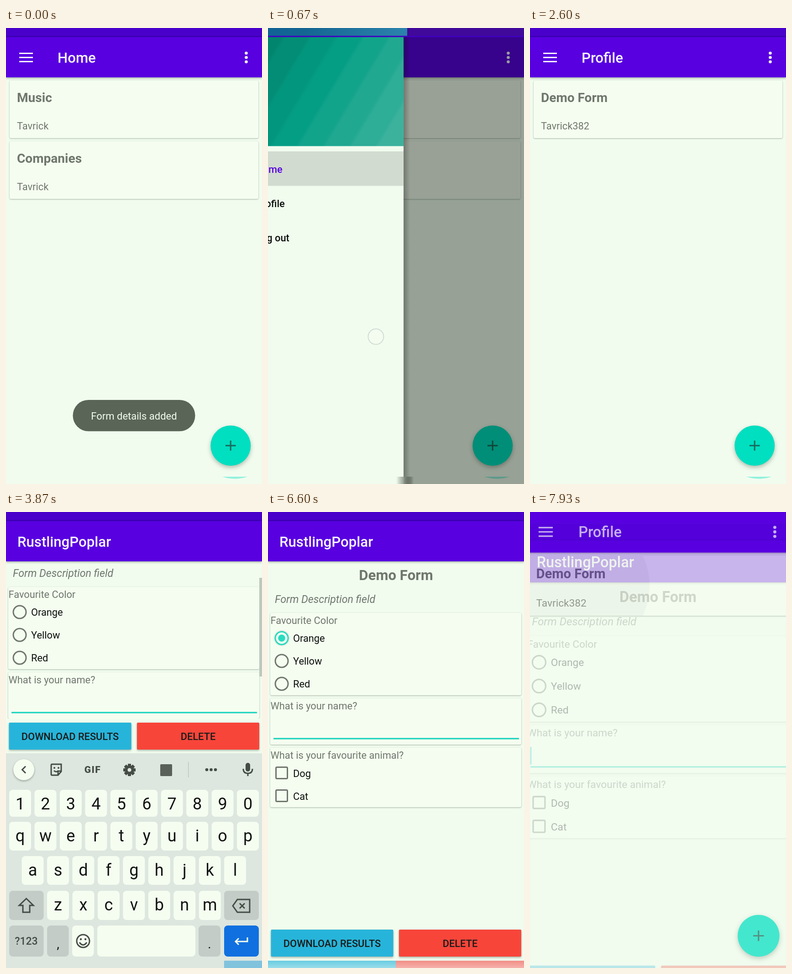
Write an HTML page that moves like this. It is 561 by 998 pixels and loops after 8000 ms.

```html
<!DOCTYPE html>
<html lang="en">
<head>
<meta charset="utf-8">
<title>Form app</title>
<style>
html, body { margin: 0; width: 100%; height: 100%; overflow: hidden; background: #f1fcef; }
svg { display: block; width: 100vw; height: 100vh; }
text { font-family: Roboto, "Noto Sans", sans-serif; font-size: 21.8px; fill: #6f776d; }
.bar { font-size: 31.2px; font-weight: 500; fill: #f7f4ff; }
.head { font-size: 28.05px; font-weight: 700; }
.med { font-weight: 500; }
.ink { fill: #0c100c; }
.mid { text-anchor: middle; }
.key { font-size: 36px; text-anchor: middle; fill: #111411; }
.card { fill: #f5fdf0; filter: drop-shadow(0 1.5px 1.5px rgba(0, 20, 0, .32)); }
.lift { filter: drop-shadow(0 4px 5px rgba(0, 20, 0, .28)); }
.low { filter: drop-shadow(0 2px 2px rgba(0, 20, 0, .32)); }
.line { fill: none; stroke-width: 3; }
</style>
</head>
<body>
<svg id="stage" viewBox="0 0 561 998" preserveAspectRatio="none"></svg>
<script>
const USER = "Tavrick", LOGIN = "Tavrick382", APP = "RustlingPoplar";
const stage = document.getElementById("stage");
const DURATION = 8000;

const rect = (x, y, w, h, fill, r = 0, more = "") =>
  `<rect x="${x}" y="${y}" width="${w}" height="${h}" rx="${r}" fill="${fill}" ${more}/>`;
const circle = (x, y, r, fill, more = "") =>
  `<circle cx="${x}" cy="${y}" r="${r}" fill="${fill}" ${more}/>`;
const text = (x, y, s, cls = "", more = "") =>
  `<text x="${x}" y="${y}" class="${cls}" ${more}>${s}</text>`;
const line = (d, color, w = 3, more = "") =>
  `<path d="${d}" class="line" style="stroke:${color};stroke-width:${w}" ${more}/>`;
const group = (id, body, more = "") => `<g id="${id}" ${more}>${body}</g>`;
const card = (x, y, w, h) => rect(x, y, w, h, "#f5fdf0", 3, 'class="card"');

const statusBar = rect(0, -16, 561, 36, "#4a00cb");
const statusEdge = rect(0, 17, 561, 3, "#3c00b4");
const toolbar = rect(0, 20, 561, 88, "#5800e0", 0, 'class="low"') + statusBar + statusEdge;

const listCard = (y, head, sub) =>
  card(8, y, 545, 126) + text(24, y + 47, head, "head") + text(24, y + 107, sub);

const menuButtons =
  line("M29 55.5H59M29 64.5H59M29 73.5H59", "#f7f4ff") +
  [55, 64.5, 74].map(y => circle(526.5, y, 3.3, "#f7f4ff")).join("");

const fab =
  `<g class="lift">${circle(492.3, 914, 44, "#00dfc0")}</g>` +
  line("M481 914H503.5M492.2 903V925", "#17695b") +
  `<path d="M474 982H530Q502 991 474 982" fill="#00dfc0" opacity=".4"/>`;

const toast =
  rect(146.5, 814, 268, 68.5, "#5b6557", 34) +
  text(280.5, 857, "Form details added", "mid", 'style="font-size:22px;fill:#f1fcef"');

const drawer =
  rect(0, 0, 436, 998, "#f1fcef") +
  rect(436, 0, 14, 982, "url(#edge)") +
  rect(420, 982, 38, 16, "url(#blur)") +
  rect(436, 0, 561, 17, "#5a12c0", 0, 'opacity=".4"') +
  rect(0, 0, 444, 17, "url(#sky)") +
  rect(0, 20, 436, 238.5, "url(#header)") +
  circle(62, 153.5, 34.3, "#3ddc84", 'class="low"') +
  text(25, 227, LOGIN, "", 'style="fill:#e9f8ef"') +
  rect(0, 270, 436, 75.5, "#d2dbd0") +
  `<path d="M44 293L29 307H33.500V321H41V312H47V321H54.500V307H59Z" fill="#5800e0"/>` +
  circle(43.500, 376.500, 6.300, "#6f776d") +
  `<path d="M31 396V392Q32 386 43.500 386T56 392V396Z" fill="#6f776d"/>` +
  line("M31 453V445H56V471H31V463M30 458H49M42.500 451L49.500 458L42.500 465", "#6f776d") +
  text(112, 317, "Home", "med", 'style="fill:#5800e0"') +
  text(112, 391.5, "Profile", "med ink") + text(112, 466.5, "Log out", "med ink");

const radio = (y, label) =>
  circle(30, y, 14, "none", 'stroke="#6f776d" stroke-width="3"') + text(55, y + 8, label, "ink");
const check = (y, label) =>
  rect(17.5, y - 12.5, 25, 25, "none", 2, 'stroke="#6f776d" stroke-width="3"') + text(55, y + 8.5, label, "ink");

const fields =
  text(280.5, 149, "Demo Form", "head mid", 'style="font-size:31.2px"') +
  text(15, 198.5, "Form Description field", "", 'style="font-size:23.2px;font-style:italic"') +
  card(5, 221, 550, 180) + text(5.5, 245, "Favourite Color") +
  radio(276, "Orange") + radio(326, "Yellow") + radio(376, "Red") +
  group("picked",
    circle(30, 276, 14, "#f5fdf0", 'stroke="#00d6ba" stroke-width="3"') + circle(30, 276, 7.8, "#00d6ba")) +
  card(5, 408, 550, 101) + text(5.5, 432, "What is your name?") +
  rect(12, 494.5, 538, 3, "#13d1bd") +
  rect(11.500, 454, 2.500, 37, "#13d1bd", 0, 'id="cursor"') +
  card(5, 516, 550, 130) + text(5.5, 540, "What is your favourite animal?") +
  check(571, "Dog") + check(621, "Cat");

const button = (x, color, label) =>
  rect(x, 914, 268, 59, color, 2, 'class="low"') +
  text(x + 134, 952, label, "med mid", 'style="fill:#191b19"');

const keyRow = (chars, x, y, h, base) => [...chars].map((c, i) => {
  const left = x + 55.45 * i;
  return rect(left, y, 48, h, "#f5fdf0", 8) + text(left + 24, base, c, "key");
}).join("");

const GREY = "#c3ccc6", INK = "#454c46";
const gear = Array.from({ length: 8 }, (_, i) =>
  rect(267, 551, 7, 7, INK, 1, `transform="rotate(${i * 45} 270.5 564.5)"`)).join("") +
  circle(270.5, 564.5, 7, "none", `stroke="${INK}" stroke-width="6"`);

const keyboard =
  rect(0, 528, 561, 470, "#dde6df") +
  circle(39, 564, 23, "#f5fdf0", 'class="low"') + line("M43 556.5L35.500 564L43 571.500", INK) +
  line("M101 552H121V568L114 576H101Q99 576 99 574V554Q99 552 101 552M122 567H114V576M105 566Q110 571 115 566", INK) +
  circle(106, 560, 2, INK) + circle(115, 560, 2, INK) +
  text(190, 571, "GIF", "mid", `style="font-weight:900;font-size:21px;fill:${INK};letter-spacing:1.5px"`) +
  gear + rect(338, 552, 26, 26, "#59605a", 2) + rect(399, 547, 1.5, 34, "#bec7c1") +
  [440, 449.5, 459].map(x => circle(x, 564, 3.3, INK)).join("") +
  rect(525, 549, 10, 19, INK, 5) + line("M520 562Q520 572 530 572T540 562M530 572V578", INK) +
  keyRow("1234567890", 7, 608, 59, 651) +
  keyRow("qwertyuiop", 7, 678, 63, 721) +
  keyRow("asdfghjkl", 34.5, 753, 63, 796) +
  keyRow("zxcvbnm", 90, 829, 64, 872) +
  rect(7, 829, 75.5, 64, GREY, 8) + line("M44.500 846L29 861H37V876H52V861H60Z", INK) +
  rect(478, 829, 76, 64, GREY, 8) +
  line("M507 848H534V876H507L497 862ZM512 856.500L523 867.500M523 856.500L512 867.500", INK) +
  rect(7, 905, 75.500, 68, GREY, 8) +
  text(44.500, 947, "?123", "med mid", `style="font-size:23px;fill:${INK}"`) +
  rect(90, 905, 47.500, 68, GREY, 8) + text(114, 955, ",", "key", 'style="font-size:28px"') +
  rect(145, 905, 47.500, 68, "#f5fdf0", 8) +
  circle(169, 939, 14, "none", `stroke="${INK}" stroke-width="3"`) +
  circle(164, 935, 2.200, INK) + circle(174, 935, 2.200, INK) + line("M161 942Q169 953 177 942", INK) +
  rect(200, 905, 215, 68, "#f5fdf0", 8) +
  rect(422, 905, 48, 68, GREY, 8) + text(446, 955, ".", "key", 'style="font-size:28px"') +
  rect(478, 905, 76, 68, "#1070e0", 8) +
  line("M529 931V940H503M510 933L503 940L510 947", "#f5fdf0") +
  rect(478, 982, 83, 16, "#38a6dc", 0, 'opacity=".55"');

const grad = (id, x1, y1, x2, y2, stops) =>
  `<linearGradient id="${id}" gradientUnits="userSpaceOnUse" x1="${x1}" y1="${y1}" x2="${x2}" y2="${y2}">` +
  stops.map(([o, c, a = 1]) => `<stop offset="${o}" stop-color="${c}" stop-opacity="${a}"/>`).join("") +
  "</linearGradient>";

// Diagonal bands: dark green up to the middle, then towards pale teal
const BANDS = 10;
const mix = (a, b, u) => `rgb(${a.map((v, i) => Math.round(v + (b[i] - v) * u))})`;
const bandColor = u => u < .55
  ? mix([0, 112, 92], [4, 158, 133], u / .55)
  : mix([4, 158, 133], [67, 181, 160], (u - .55) / .45);
const bands = Array.from({ length: BANDS }, (_, i) => {
  const color = bandColor((i + .5) / BANDS);
  return [[(i + .08) / BANDS, color], [(i + .92) / BANDS, color]];
}).flat();

stage.innerHTML =
  "<defs>" +
  grad("header", 0, 20, 425, 275, bands) +
  grad("sky", 0, 0, 436, 0, [[0, "#0a5c9c"], [.5, "#146692"], [1, "#2b82ac"]]) +
  grad("edge", 436, 0, 450, 0, [[0, "#000", .26], [1, "#000", 0]]) +
  grad("blur", 420, 0, 458, 0, [[0, "#f1fcef"], [.55, "#6d756a", .8], [1, "#000", 0]]) +
  grad("fade", 0, 982, 0, 998, [[0, "#fff", .2], [1, "#fff", .45]]) +
  `<clipPath id="body"><rect id="window" x="0" y="108" width="561" height="797"/></clipPath>` +
  `<clipPath id="firstCard"><rect x="8" y="115" width="545" height="126" rx="3"/></clipPath>` +
  "</defs>" +
  group("main",
    rect(-20, -20, 601, 1038, "#f1fcef") +
    group("home", listCard(115, "Music", USER) + listCard(248, "Companies", USER)) +
    group("profile", listCard(115, "Demo Form", LOGIN)) +
    circle(120, 178, 0, "#000", 'id="ripple" opacity=".04" clip-path="url(#firstCard)"') +
    toolbar + text(113, 76, "", "bar", 'id="title"') + menuButtons + fab +
    group("toast", toast) +
    rect(0, 0, 561, 998, "#000a00", 0, 'id="scrim"') +
    group("drawer", drawer) +
    rect(0, 17, 561, 3, "#4100bd", 0, 'id="seam"')) +
  group("form",
    rect(0, -16, 561, 1030, "#f1fcef") +
    `<g clip-path="url(#body)">${group("fields", fields)}</g>` +
    rect(555, 144, 6, 216, "#bfc8bd", 0, 'id="thumb"') +
    toolbar + text(25, 76, APP, "bar") +
    group("buttons",
      button(6.5, "#27b4da", "DOWNLOAD RESULTS") + button(287, "#f8453a", "DELETE") +
      rect(0, 982, 280, 16, "#45c0da") + rect(280, 982, 281, 16, "#ee7268") +
      rect(0, 982, 561, 16, "url(#fade)"))) +
  group("keyboard", keyboard) +
  circle(0, 0, 17, "#f5fdf0", 'id="dot" fill-opacity=".5" stroke="#d3ddd6" stroke-width="2"');

const el = {};
stage.querySelectorAll("[id]").forEach(n => el[n.id] = n);
const set = (id, name, value) => el[id].setAttribute(name, value);
const show = (id, on) => set(id, "visibility", on ? "visible" : "hidden");
const ramp = (t, a, b) => Math.min(1, Math.max(0, (t - a) / (b - a)));
const easeOut = x => 1 - (1 - x) ** 2;
const smooth = x => x * x * (3 - 2 * x);

// Touches: start, end, from x,y to x,y
const touches = [
  [130, 800, 12, 690, 290, 672],
  [1330, 1540, 68, 384, 68, 384],
  [3330, 3450, 120, 178, 120, 178],
  [6500, 6640, 30, 276, 30, 276]
];

function drawDrawer(t) {
  let right = 0;
  if (t < 670) right = 296 * ramp(t, 200, 670);
  else if (t < 1470) right = 296 + 140 * easeOut(ramp(t, 670, 930));
  else right = 436 * (1 - smooth(ramp(t, 1470, 1730)));
  set("drawer", "transform", `translate(${right - 436})`);
  show("drawer", right > 0);
  show("seam", right > 0);
  set("scrim", "opacity", .64 * (right / 436) ** 1.38);
}

function drawForm(t) {
  // away: 0 when the form fills the screen, 1 when it is gone
  const closing = t > 7500;
  const away = closing ? .72 * smooth(ramp(t, 7470, 7930)) : 1 - easeOut(ramp(t, 3450, 3720));
  show("form", away < 1);
  set("form", "opacity", 1 - away);
  const s = 1 + .0563 * away;
  set("form", "transform", `translate(${280.5 * (1 - s)} ${58 * away}) scale(${s})`);
  const p = t > 3450 ? 1 + .145 * (1 - away) : 1;
  set("main", "transform", `translate(${280.5 * (1 - p)} ${583 * (1 - p)}) scale(${p})`);

  const k = easeOut(ramp(t, 3600, 3850)) * (1 - smooth(ramp(t, 3990, 4260)));
  show("keyboard", k > 0);
  set("keyboard", "transform", `translate(0 ${470 * (1 - k)})`);
  set("fields", "transform", `translate(0 ${-57 * k})`);
  set("buttons", "transform", `translate(0 ${-453 * k})`);
  set("window", "height", 797 - 453 * k);
  set("thumb", "opacity", k);
  show("picked", t >= 6570 && t < 7070);
  show("cursor", t > 4300 && (t + 370) % 1000 < 500);
}

function render(t) {
  const moved = t >= 1470;
  el.title.textContent = moved ? "Profile" : "Home";
  show("home", !moved);
  show("profile", t >= 1870);
  set("toast", "opacity", 1 - ramp(t, 60, 400));
  set("ripple", "r", 143 * easeOut(ramp(t, 3330, 3560)));
  drawDrawer(t);
  drawForm(t);
  const touch = touches.find(([a, b]) => t >= a && t < b);
  show("dot", !!touch);
  if (touch) {
    const [a, b, x0, y0, x1, y1] = touch;
    const u = ramp(t, a, b);
    set("dot", "cx", x0 + (x1 - x0) * u);
    set("dot", "cy", y0 + (y1 - y0) * u);
    set("dot", "opacity", ramp(t, b, b - 120));
  }
}

function frame() {
  render(performance.now() % DURATION);
  requestAnimationFrame(frame);
}
frame();
</script>
</body>
</html>
```
